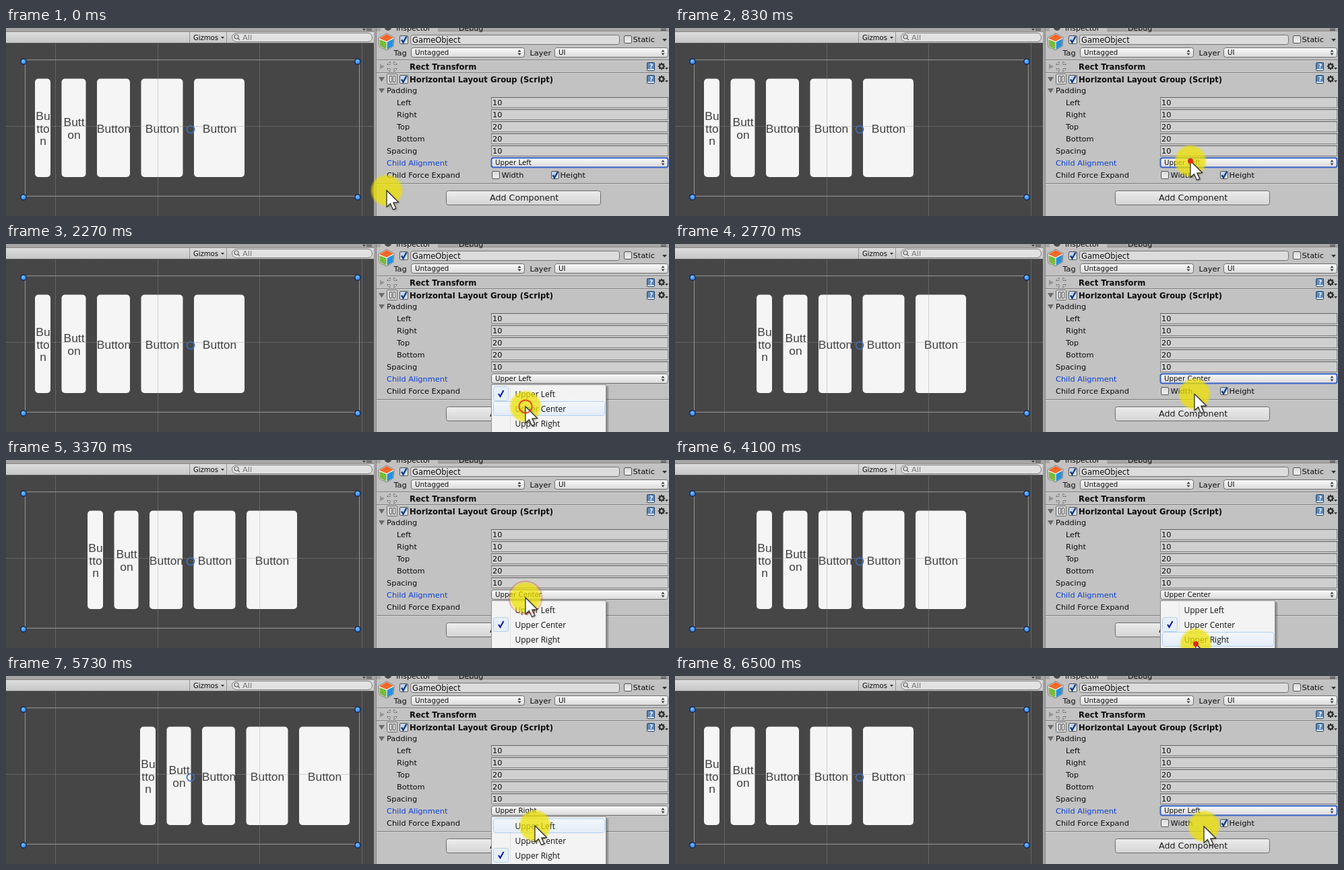
These frames come from a looping animation (984x280 px, 6.53 s). An HTML page with a canvas:

```html
<!DOCTYPE html>
<html lang="en">
<head>
<meta charset="utf-8">
<title>Child alignment</title>
<style>
html, body { margin: 0; width: 984px; height: 280px; overflow: hidden; background: #c2c2c2; }
canvas { display: block; }
</style>
</head>
<body>
<canvas id="stage" width="984" height="280"></canvas>
<script>
const ctx = document.getElementById('stage').getContext('2d');
const LOOP = 6530;
const UI = '"DejaVu Sans", sans-serif';
const OPTIONS = ['Upper Left', 'Upper Center', 'Upper Right'];

// Pointer stops: [time, x, y]
const PATH = [
  [230, 565, 242], [630, 765, 198], [1080, 765, 198], [1370, 770, 233],
  [1700, 770, 233], [1800, 771, 242], [2610, 771, 242], [2930, 771, 205],
  [3480, 771, 205], [3730, 773, 274], [4480, 773, 274], [4730, 783, 216],
  [4770, 783, 215], [4870, 791, 203], [5430, 791, 203], [5730, 785, 223],
  [6530, 785, 224]
];
const CLICKS = [830, 2170, 3000, 4100, 5030, 6030];
const MENUS = [[830, 2170], [3000, 4100], [5030, 6030]];
const PICKS = [[2170, 1], [4100, 2], [6030, 0]];

const clamp = v => Math.max(0, Math.min(1, v));
const ease = p => p * p * (3 - 2 * p);

function rect(x, y, w, h, fill) {
  ctx.fillStyle = fill;
  ctx.fillRect(x, y, w, h);
}

function box(x, y, w, h, r, fill, stroke, width = 1) {
  ctx.beginPath();
  ctx.roundRect(x + .5, y + .5, w - 1, h - 1, r);
  if (fill) { ctx.fillStyle = fill; ctx.fill(); }
  if (stroke) { ctx.strokeStyle = stroke; ctx.lineWidth = width; ctx.stroke(); }
}

function text(str, x, y, { size = 11.35, color = '#0c0c0c', weight = '', family = UI, align = 'left' } = {}) {
  ctx.font = `${weight} ${size}px ${family}`;
  ctx.fillStyle = color;
  ctx.textAlign = align;
  ctx.fillText(str, x, y);
}

function shape(points, fill, stroke, width = 1) {
  ctx.beginPath();
  points.forEach(([x, y]) => ctx.lineTo(x, y));
  ctx.closePath();
  if (fill) { ctx.fillStyle = fill; ctx.fill(); }
  if (stroke) { ctx.strokeStyle = stroke; ctx.lineWidth = width; ctx.stroke(); }
}

function disc(x, y, r, fill, stroke, width = 1) {
  ctx.beginPath();
  ctx.arc(x, y, r, 0, Math.PI * 2);
  if (fill) { ctx.fillStyle = fill; ctx.fill(); }
  if (stroke) { ctx.strokeStyle = stroke; ctx.lineWidth = width; ctx.stroke(); }
}

function shade(y, h, top, bottom) {
  const g = ctx.createLinearGradient(0, y, 0, y + h);
  g.addColorStop(0, top);
  g.addColorStop(1, bottom);
  return g;
}

function tick(x, y, color, width = 2) {
  ctx.beginPath();
  ctx.moveTo(x - 3.5, y);
  ctx.lineTo(x - 1, y + 4);
  ctx.lineTo(x + 4, y - 5);
  ctx.strokeStyle = color;
  ctx.lineWidth = width;
  ctx.stroke();
}

function checkbox(x, y, on, size = 12) {
  const fill = on ? shade(y, size, '#b9cdea', '#e2ecf8') : shade(y, size, '#d8d8d8', '#f2f2f2');
  box(x, y, size, size, 1.5, fill, '#555');
  if (on) tick(x + size / 2, y + size / 2, '#1b3f80', 2.5);
}

function dropdown(label, x, y, w, focused) {
  box(x, y, w, 15, 3, shade(y, 15, '#fbfbfb', '#d9d9d9'), focused ? '#3763c8' : '#6c6c6c', focused ? 2 : 1);
  text(label, x + 6, y + 11, { size: 10.3 });
  const ax = x + w - 8, ay = y + 7.5;
  shape([[ax - 2.5, ay - 1], [ax + 2.5, ay - 1], [ax, ay - 4]], '#333');
  shape([[ax - 2.5, ay + 1], [ax + 2.5, ay + 1], [ax, ay + 4]], '#333');
}

function foldout(x, y, open) {
  shape(open ? [[x - 4, y - 3], [x + 5, y - 3], [x + .5, y + 4]]
             : [[x - 2, y - 4], [x + 5, y], [x - 2, y + 4]], open ? '#6a6a6a' : '#959595');
}

function headerIcons(y) {
  box(951, y - 6, 12, 13, 1, '#5b86b8', '#24466f');
  rect(952, y + 4, 10, 2, '#dfe8f2');
  text('?', 957.5, y + 3, { size: 9, weight: 'bold', color: '#fff', align: 'center' });
  for (let i = 0; i < 8; i++) {
    const a = i * Math.PI / 4;
    disc(973 + 4.3 * Math.cos(a), y + 4.3 * Math.sin(a), 1.1, '#303030');
  }
  disc(973, y, 3, null, '#303030', 2.2);
  shape([[978, y + 2], [983, y + 2], [980.5, y + 5]], '#303030');
}

function buttons(shift) {
  const sizes = [[43, 23], [82.5, 36], [135, 49], [200.5, 62], [279, 75]];
  const lines = [['Bu', 'tto', 'n'], ['Butt', 'on'], ['Button'], ['Button'], ['Button']];
  ctx.filter = 'blur(0.5px)';
  sizes.forEach(([x, w], i) => {
    ctx.beginPath();
    ctx.roundRect(x + shift, 75.5, w, 146.5, 5);
    ctx.fillStyle = '#f5f5f5';
    ctx.fill();
    lines[i].forEach((line, n) => {
      const y = 155.5 + (n - (lines[i].length - 1) / 2) * 18.5;
      text(line, x + shift + w / 2 + .5, y, {
        size: 17.4, color: '#404040', family: '"Liberation Sans", sans-serif', align: 'center'
      });
    });
  });
  ctx.filter = 'none';
}

function scene(pick) {
  rect(0, 0, 548, 280, '#464646');
  buttons(pick * 78);
  const grid = 'rgba(150,150,150,.38)';
  [73, 225, 376, 528].forEach(x => rect(x, 23, 1, 257, grid));
  rect(0, 146, 546, 1, grid);
  ctx.strokeStyle = '#989898';
  ctx.lineWidth = 1;
  ctx.strokeRect(28.5, 47.5, 496, 203);
  [26, 522].forEach(x => [50, 252].forEach(y => {
    const g = ctx.createRadialGradient(x - 1, y - 1.5, 0, x, y, 4.5);
    g.addColorStop(0, '#8cc6ff');
    g.addColorStop(1, '#1f72e0');
    disc(x, y, 4.2, g, '#10264a', 1.2);
  }));
  disc(274, 151, 5.5, null, '#3e6fb8', 1.7);

  rect(0, 0, 548, 5, '#a6a6a6');
  rect(0, 5, 548, 18, shade(5, 18, '#dedede', '#c6c6c6'));
  rect(0, 5, 548, 1, '#858585');
  rect(0, 22, 548, 1, '#5a5a5a');
  [272, 327].forEach(x => rect(x, 6, 1, 16, '#939393'));
  text('Gizmos', 278, 18, { size: 10 });
  shape([[319, 13], [324, 13], [321.5, 16]], '#333');
  box(335, 7, 209, 14, 7, '#e2e2e2', '#7d7d7d');
  disc(342, 13, 3, null, '#666', 1.2);
  shape([[344, 15], [347, 18]], null, '#666', 1.2);
  text('All', 351, 18, { color: '#777' });
  rect(535, 1, 8, 1, '#444');
  rect(535, 3, 8, 1, '#444');
  shape([[529, 1], [534, 1], [531.5, 4]], '#444');
}

function objectIcon() {
  shape([[553, 15], [565, 8], [576, 14], [575, 27], [565, 33], [554, 28]], '#fff', '#777');
  shape([[554, 15.5], [565, 9], [575, 14.5], [565, 20]], '#f2682a');
  shape([[554.5, 17], [564.5, 21], [564.5, 32], [555, 27]], '#7cb83a');
  shape([[575, 16], [565.5, 21], [565.5, 32], [574.5, 26.5]], '#2a8fd8');
}

function transformIcon() {
  [[-1, -1], [1, -1], [-1, 1], [1, 1]].forEach(([sx, sy]) => {
    const x = 573 + sx * 3, y = 57.5 + sy * 3;
    shape([[x, y + sy * 4.5], [x, y], [x + sx * 4.5, y]], '#e2e2e2', '#777');
  });
}

function inspector(pick, menuOpen) {
  rect(546, 0, 438, 280, '#c2c2c2');
  rect(546, 0, 3, 280, '#a2a2a2');
  rect(549, 0, 1, 280, '#858585');
  rect(550, 0, 434, 5, '#a6a6a6');
  rect(556, 0, 85, 5, '#c2c2c2');
  rect(641, 4, 343, 1, '#8a8a8a');
  disc(567, -1, 5, '#4a4a4a');
  text('Inspector', 579, 4, { size: 11 });
  text('Debug', 672, 4, { size: 11 });
  rect(972, 1, 8, 1, '#444');
  rect(972, 3, 8, 1, '#444');

  objectIcon();
  checkbox(584, 11, true, 13);
  box(600, 10, 311, 15, 3, '#dcdcdc', '#747474');
  text('GameObject', 603, 22, { size: 11.5 });
  checkbox(917, 11, false);
  text('Static', 930.5, 21);
  shape([[974, 16], [981, 16], [977.5, 20]], '#333');
  text('Tag', 575.5, 41);
  dropdown('Untagged', 601, 29, 169);
  text('Layer', 777.5, 41);
  dropdown('UI', 814, 29, 169);

  [47, 66].forEach(y => {
    rect(550, y, 434, 1, '#7d7d7d');
    rect(550, y + 1, 434, 1, '#d4d4d4');
  });
  foldout(557, 57.5, false);
  transformIcon();
  text('Rect Transform', 599, 62, { size: 11.6, weight: 'bold' });
  headerIcons(57);
  foldout(557, 76, true);
  box(565, 68, 16, 16, 1, '#d5d5d5', '#6b6b6b');
  [569, 574].forEach(x => box(x, 71, 4, 10, 0, '#f1f1f1', '#555'));
  checkbox(584, 70, true, 13);
  text('Horizontal Layout Group (Script)', 599, 81, { size: 11.6, weight: 'bold' });
  headerIcons(76);

  foldout(557, 93, true);
  text('Padding', 565, 97);
  [['Left', 10], ['Right', 10], ['Top', 20], ['Bottom', 20], ['Spacing', 10]].forEach(([name, value], i) => {
    const y = 103 + i * 18;
    text(name, i < 4 ? 580 : 565, y + 12);
    box(720, y, 263, 16, 0, '#cfcfcf', '#858585');
    rect(720, y, 263, 1, '#636363');
    text(value, 722, y + 12);
  });
  text('Child Alignment', 565, 205, { color: '#0b3fd6' });
  dropdown(OPTIONS[pick], 720, 193, 263, !menuOpen);
  text('Child Force Expand', 565, 223);
  checkbox(721, 213, false);
  text('Width', 735.5, 223);
  checkbox(809, 213, true);
  text('Height', 822.5, 223);
  rect(550, 231, 434, 1, '#7d7d7d');
  rect(550, 232, 434, 1, '#d4d4d4');
  box(653, 242, 230, 22, 3, shade(242, 22, '#ededed', '#d4d4d4'), '#6c6c6c');
  text('Add Component', 718, 257, { size: 12.7, color: '#1c1c1c' });
}

function menu(pick, hover, alpha) {
  ctx.globalAlpha = alpha;
  for (let i = 4; i > 0; i--) rect(724, 212, 167 + i, 80, 'rgba(0,0,0,.09)');
  box(720, 209, 171, 90, 0, '#f3f3f3', '#8f8f8f');
  rect(748, 211, 1, 80, '#e2e3e3');
  OPTIONS.forEach((label, i) => {
    const y = 212 + i * 22;
    if (i === hover) box(723, y, 166, 22, 3, shade(y, 22, '#f3f6fb', '#e3edf8'), '#aecff0');
    if (i === pick) {
      box(723, y, 23, 22, 3, '#e6eff8', '#b4d0ec');
      tick(734.5, y + 11, '#0c12a1', 2);
    }
    text(label, 755.5, y + 15.5, { size: 12, color: '#111', family: '"Open Sans", sans-serif' });
  });
  ctx.globalAlpha = 1;
}

function pointerAt(t) {
  let a = PATH[0];
  for (const b of PATH) {
    if (t < b[0]) {
      const p = b === a ? 0 : ease(clamp((t - a[0]) / (b[0] - a[0])));
      return [a[1] + (b[1] - a[1]) * p, a[2] + (b[2] - a[2]) * p];
    }
    a = b;
  }
  return [a[1], a[2]];
}

function pointer(x, y) {
  const glow = ctx.createRadialGradient(x, y, 0, x, y, 25);
  glow.addColorStop(0, 'rgba(238,225,0,.76)');
  glow.addColorStop(.82, 'rgba(238,225,0,.74)');
  glow.addColorStop(1, 'rgba(238,225,0,0)');
  disc(x, y, 25, glow);
  const arrow = [[0, 0], [0, 24.5], [5.5, 19.5], [9.5, 28.5], [13.8, 26.6], [9.8, 18], [17.5, 17.5]]
    .map(([dx, dy]) => [x + dx, y + dy]);
  ctx.save();
  ctx.shadowColor = 'rgba(0,0,0,.4)';
  ctx.shadowBlur = 3;
  ctx.shadowOffsetX = ctx.shadowOffsetY = 1.5;
  shape(arrow, '#fff');
  ctx.restore();
  shape(arrow, null, '#222', 1.2);
}

function ripple(t) {
  for (const start of CLICKS) {
    const p = (t - start) / 450;
    if (p < 0 || p >= 1) continue;
    const [x, y] = pointerAt(start);
    ctx.globalAlpha = 1 - p * .85;
    if (p < .18) disc(x, y, 4 + p * 12, '#e02b12');
    else disc(x, y, 4 + p * 25, null, '#e02b12', 2);
    ctx.globalAlpha = 1;
  }
}

function draw(t) {
  let pick = 0, aligned = 0;
  for (const [time, value] of PICKS) {
    if (t >= time + 120) pick = value;
    if (t >= time + 300) aligned = value;
  }
  const [x, y] = pointerAt(t);
  const open = MENUS.find(([from, to]) => t >= from + 100 && t < to + 300);
  const focusLost = open && t < open[1] + 120;

  scene(aligned);
  inspector(pick, focusLost);
  if (open) {
    const [from, to] = open;
    const alpha = Math.min(clamp((t - from - 100) / 180), 1 - clamp((t - to - 100) / 200));
    const shown = MENUS.indexOf(open);
    const tipY = pointerAt(Math.min(t, to))[1];
    menu(shown, tipY < 212 ? -1 : Math.floor((tipY - 212) / 22), alpha);
  }
  pointer(x, y);
  ripple(t);
}

const begin = performance.now();
function frame() {
  draw((performance.now() - begin) % LOOP);
  requestAnimationFrame(frame);
}
frame();
</script>
</body>
</html>
```
